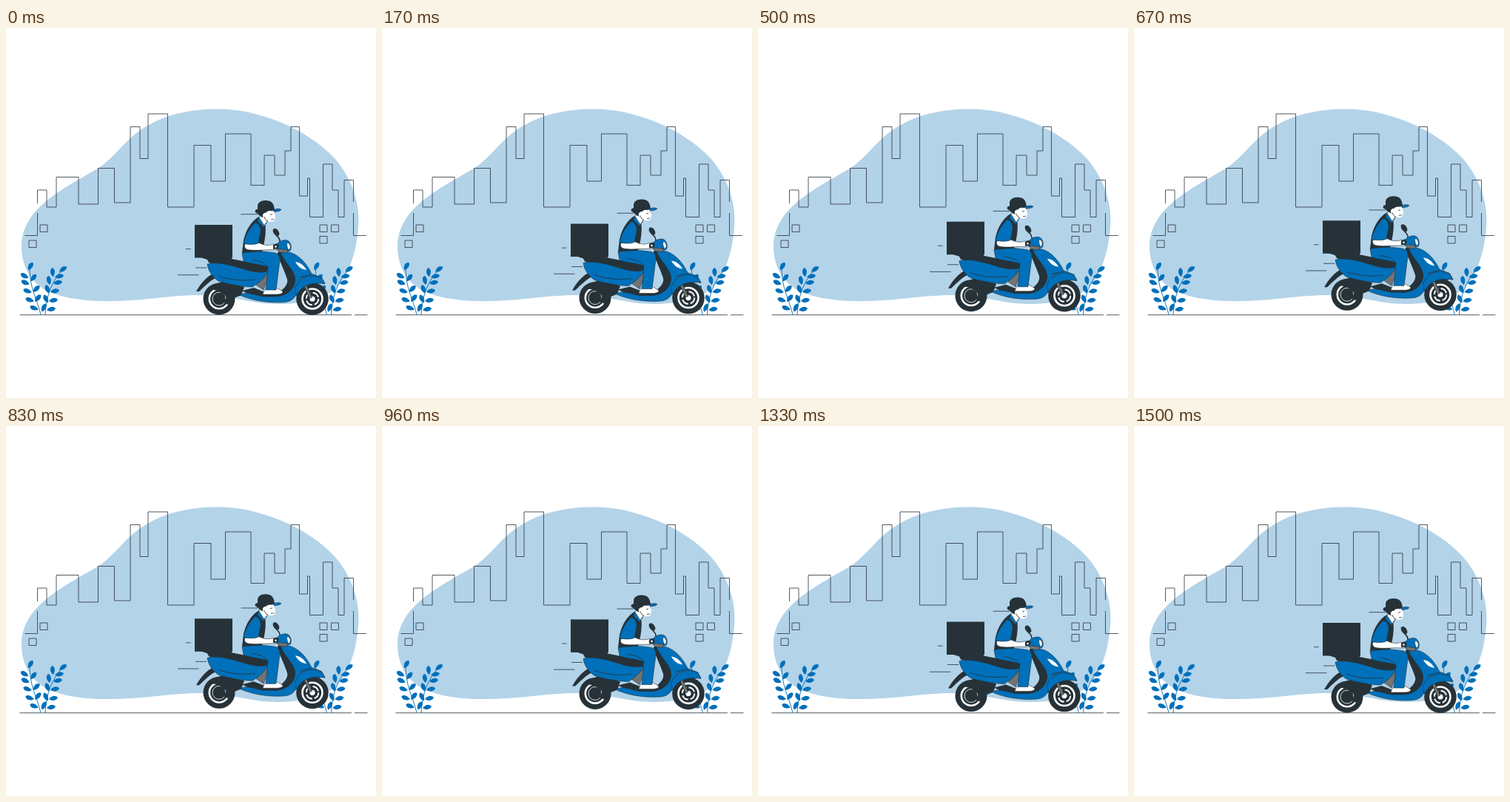
Animation, 500 px wide and 500 px high, one loop 1.54 s. Source, as an HTML page:

```html
<!DOCTYPE html>
<html lang="en">
<head>
<meta charset="utf-8">
<title>Scooter delivery</title>
<style>
  html, body { margin: 0; width: 100%; height: 100%; overflow: hidden; background: #fff; }
  svg { display: block; width: 100%; height: 100%; }
  .line { fill: none; stroke: #263238; stroke-width: .8; }
  .blue { fill: #0070ba; }
  .dark { fill: #263238; }
  .white { fill: #fff; }
  .edge { stroke: #263238; stroke-width: .6; stroke-linejoin: round; }
  .stem { fill: none; stroke: #0070ba; stroke-width: .9; }
</style>
</head>
<body>
<svg viewBox="0 0 500 500">
  <defs>
    <path id="leaf" class="blue" d="M-6-.6C-4-4 2-4 6 .4C2 4-4 4-6-.6Z"/>
    <g id="bush">
      <path class="stem" d="M47 387.5C42 366 31 350 32 322M53 387.5C54 362 62 342 77 326"/>
    </g>
  </defs>

  <path fill="#b3d3e9" d="M21 296C21 245 72 220 124 190C150 173 163 146 195 130C221 115 255 109.5 287 109.5C340 109.5 405 135 443 175C468 203 477 235 476.5 262C475 300 465 330 447 350C432 366 400 373 368 373C330 373 305 361 262 361C220 361 190 369 135 369C95 369 58 362 40 344C28 332 21 315 21 296Z"/>

  <path class="line" d="M25.5 280.5H42.5V250M42.5 237V219H55V242H68V201.5H98V238H124.5V189.5H146.5V236H168V133.5H181V176.5H192V116H218.5V242H254V158.5H277V207H296.5V143H331V212.5H349V172H363V199H377V166H385V133.5H396.5V227H407.5V203H410.5V255.5H428.5V184H441V219H449V255.5H457V205.5H469.5V235M469.5 250V280.5H487"/>
  <path class="line" d="M46 266h10v9.5h-10zM31 287h10v9.5h-10zM424 266h10v9.5h-10zM439.5 266h10v9.5h-10zM424 281.5h10v9.5h-10z"/>
  <path class="line" d="M18.5 387.7H467M471 387.7H488.5"/>

  <use href="#bush"/>
  <use href="#bush" x="386.5"/>

  <g id="ride">
    <path class="line" d="M317.5 251.7H340M243 298.6H249.5M256 324H271M232 333.7H260.500"/>

    <!-- wheels -->
    <circle class="dark" cx="288" cy="366" r="21.5"/>
    <circle cx="288" cy="366" r="13.2" fill="none" stroke="#fff" stroke-width="2.6"/>
    <circle cx="288" cy="366" r="9" fill="none" stroke="#fff" stroke-width=".8"/>
    <circle class="dark" cx="414" cy="366" r="21.8"/>
    <circle cx="414" cy="366" r="13.5" fill="none" stroke="#fff" stroke-width="2.6"/>
    <circle cx="414" cy="366" r="8.2" fill="none" stroke="#fff" stroke-width="2" stroke-dasharray="10 3"/>
    <circle class="white" cx="414" cy="366" r="3.6"/>

    <!-- rear end -->
    <path class="dark" d="M257 356C263 346 270 336 282 331L287 337C277 339 269 349 261 356Z"/>
    <path class="dark" d="M275 354C279 347 288 343 298 342L322 350L318 361L308 365L300 374L294 371L298 364C292 358 285 353 275 354Z"/>
    <path class="dark" d="M260 309H305V312L320 315C338 317 352 318 356 323C356 330 350 332 342 331L300 324L274 317L272 313Z"/>
    <path fill="#737373" class="edge" d="M332 343L353 328L357 331L348 354Z"/>
    <path class="blue edge" d="M272 319C285 315 306 321 325 327C335 330 345 331 354 329C350 338 342 344 333 350C320 350 300 346 287 342C279 336 273 328 272 319Z"/>
    <path class="line" d="M287 335C304 341 320 342 337 340"/>

    <!-- deck and front shield -->
    <path class="dark" d="M319 355L335 351L350 357H370L382 346C378 330 370 318 367 303L374 301L396 330L393 352L378 366L340 366Z"/>
    <path class="blue edge" d="M316 361C324 355 336 361 348 363H366C382 361 391 351 390 338C388 325 374 314 371 303C386 299 403 311 413 332L426 337L431 345C414 343 402 347 396 355C390 363 389 369 377 370.500C356 372 334 369 316 361Z"/>
    <path class="dark" d="M369 303C374 316 391 326 391 340C391 350 383 358 374 360L364 361C379 351 383 344 379 333C375 322 368 313 367 304Z"/>
    <path class="white" d="M391 316C398 317 403 321 406 327C399 326 394 322 391 316Z"/>
    <path class="line" d="M397 337L413 333M399 343L428 339"/>
    <path d="M400 338L412 365" stroke="#263238" stroke-width="4.600"/>
    <path d="M400 338L412 365" stroke="#737373" stroke-width="3"/>
    <path class="blue edge" d="M391 350C396 340 405 334 417 335L427 338L431 346C416 343 403 347 397 355L392 362Z"/>

    <!-- handlebar -->
    <path class="line" style="stroke-width:1.6" d="M365 280C369 283 371 286 370 291"/>
    <ellipse class="dark" cx="365" cy="276" rx="3.500" ry="5.700" transform="rotate(-35 365 276)"/>
    <path class="blue edge" d="M367 291C371 287 378 285 382 288C386 292 386 298 384 301L373 303L365 299Z"/>
    <path class="white edge" d="M380 290C384 291 386 297 382 300C380 297 379 293 380 290Z"/>
    <path fill="#737373" class="edge" d="M367 298L381 300L379 304L369 303Z"/>

    <!-- rider -->
    <path class="white edge" d="M353 350H364L374 356C374 359 370 360 365 360H347C348 356 350 353 353 350Z"/>
    <path class="blue edge" d="M319 304C330 299 350 302 364 304C371 306 371 312 369 322L365 354H351L354 323C344 319 330 319 321 315Z"/>
    <path class="line" d="M332 313C344 315 352 318 354 324"/>
    <path class="dark" d="M342 255C332 260 324 273 321 287L319 304L346 302C350 288 352 274 350 263Z"/>
    <path class="blue" d="M342 255L340 261L348 269L353 263Z"/>
    <path class="white edge" d="M345 252L342 256L349 267L353 261Z"/>
    <path class="dark" d="M340 241C340 236 344 233 351 233C358 233 362 236 363 246L355 249L351 256C346 257 343 254 340 251L337 249C336 247 337 245 340 245Z"/>
    <path class="white" d="M351 250C354 246 358 247 362 248L364 254L363 260C360 263 355 262 352 260L347 255C346 252 349 249 351 250Z"/>
    <path class="line" d="M357 252.500L360 251.500M358 259L362 258.500M354 261C351 260 350 258 349 255"/>
    <path class="blue edge" d="M362 245.500C366 244 370 244 372 245.500C370 248 366 248 362 248.500Z"/>
    <path class="white edge" d="M323 292L341 290C347 293 354 295 361 292L367 294L367 298L361 300C351 299 334 302 325 299C322 297 322 294 323 292Z"/>
    <path class="blue edge" d="M337 263C342 264 345 270 344 277L341 291C335 293 328 293 321 291C323 281 329 270 337 263Z"/>
    <path class="dark" d="M361 293L366 291L369 294L367 298L361 299Z"/>
    <circle class="white" cx="364.500" cy="295.500" r="1.300"/>

    <rect class="dark" x="255" y="266" width="51" height="44.500"/>
  </g>
</svg>
<script>
  // x, y, tilt in degrees
  const leaves = [
    [33, 322, 115], [25, 335, 25], [37, 337.5, 125], [26, 344, 20], [41, 352.5, 130],
    [29, 355.500, 15], [43, 365, 125], [32, 367.5, 15], [51, 378, 110], [38, 378.500, 15],
    [77, 326, 140], [63, 330, 80], [72, 335.5, 165], [58, 341, 75], [70, 344, 165],
    [56, 353, 65], [66, 355.500, 165], [54, 366, 60], [64, 368, 165], [61, 380, 165]
  ];
  document.getElementById('bush').insertAdjacentHTML('beforeend', leaves.map(([x, y, tilt]) =>
    `<use href="#leaf" transform="translate(${x} ${y}) rotate(${tilt})"/>`).join(''));

  const LOOP = 1540, BOB = 1500, HEIGHT = 6.4;
  const ride = document.getElementById('ride');
  const start = performance.now();

  function draw(now) {
    const phase = Math.min(Math.max(0, now - start) % LOOP / BOB, 1);
    const lift = HEIGHT * (1 - Math.abs(2 * phase - 1));
    ride.setAttribute('transform', `translate(0 ${-lift})`);
    requestAnimationFrame(draw);
  }
  draw(start);
</script>
</body>
</html>
```
